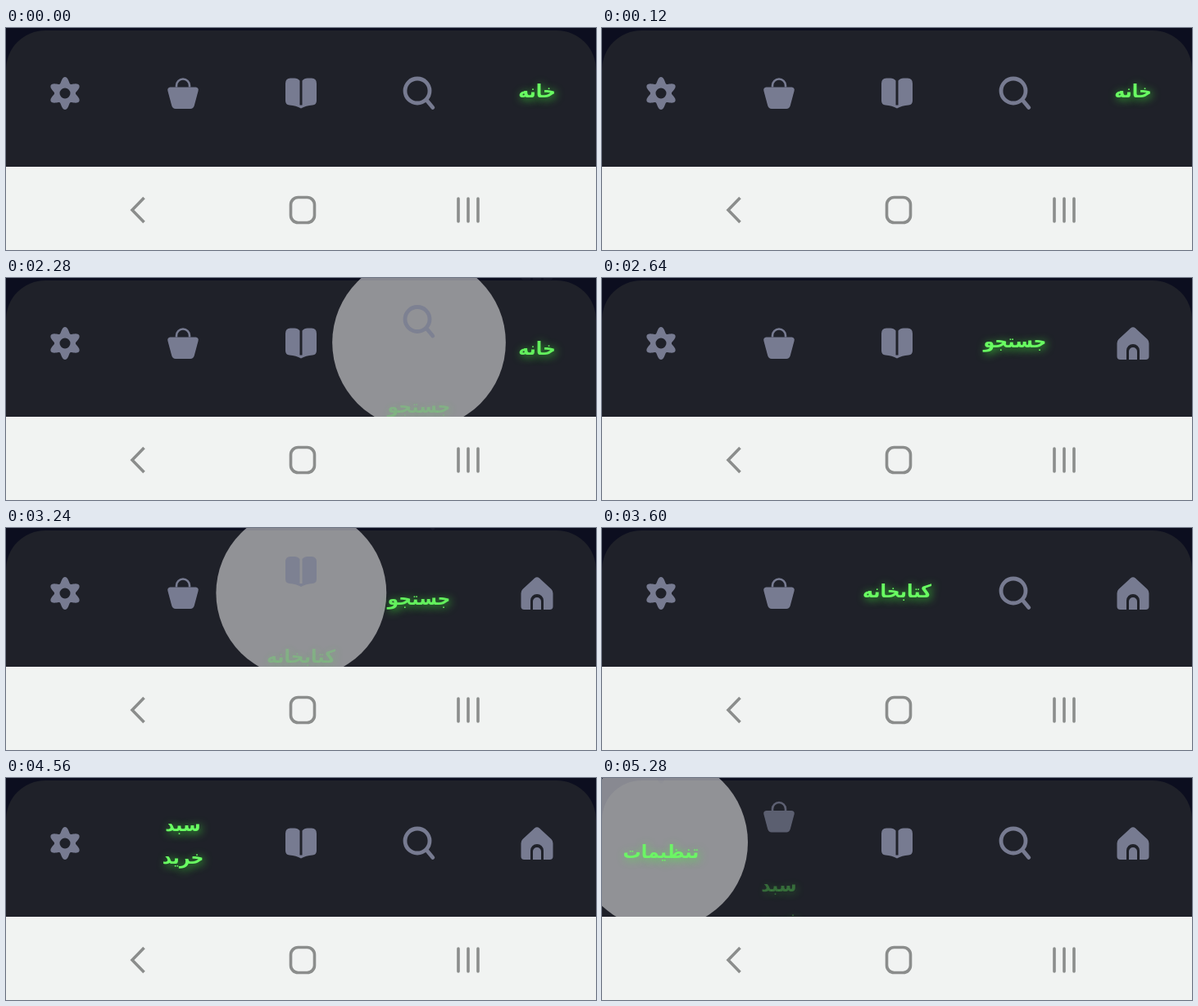
Write an HTML page with a canvas that moves like this. It is 720 px wide and 272 px high and loops after 5.4 s.

```html
<!DOCTYPE html>
<html lang="fa">
<head>
<meta charset="utf-8">
<style>
  html, body { margin: 0; width: 100%; height: 100%; overflow: hidden; background: #0c0e1f; }
  canvas { display: block; }
</style>
</head>
<body>
<canvas id="stage" width="720" height="272"></canvas>
<script>
const ctx = document.getElementById('stage').getContext('2d');
const LOOP = 5400, STEP = 120;
const BAR_BOTTOM = 170, TRAVEL = 106, LAG = 45, MOVE = 300;
const ICON = '#777b91', GREEN = '#69ff62';

// press: touch down, shift: icons start to slide, fade: ripple starts to vanish
const taps = [
  { press: 1993, shift: 2180, fade: 2285 },
  { press: 2990, shift: 3140, fade: 3245 },
  { press: 3885, shift: 4027, fade: 4165 },
  { press: 4925, shift: 5047, fade: 5285 }
];

const clamp = v => Math.max(0, Math.min(1, v));
const easeInOut = v => (1 - Math.cos(Math.PI * clamp(v))) / 2;
const easeOut = v => 1 - (1 - clamp(v)) ** 2;

function gearPath() {
  const path = new Path2D();
  for (let deg = 0; deg < 360; deg += 3) {
    const a = deg * Math.PI / 180;
    const r = 16.4 - 3.5 * Math.cos(6 * a);
    path.lineTo(r * Math.cos(a), r * Math.sin(a));
  }
  path.closePath();
  path.moveTo(6.5, 0);
  path.arc(0, 0, 6.5, 0, 2 * Math.PI);
  return path;
}

function searchPath() {
  const path = new Path2D();
  path.arc(-2, -3, 15, Math.PI / 4, Math.PI * 9 / 4);
  path.lineTo(16.8, 17.5);
  return path;
}

const items = [
  { lines: ['تنظیمات'], fill: gearPath() },
  {
    lines: ['سبد', 'خرید'],
    fill: new Path2D('M-15.5,-7.5H15.5Q19.5,-7 18.6,-3L13.8,15Q12.6,19 9,19H-9Q-12.6,19 -13.8,15L-18.6,-3Q-19.5,-7 -15.5,-7.5Z'),
    stroke: new Path2D('M-8,-7.5V-9.5A8,8 0 0 1 8,-9.5V-7.5'), width: 2.6, cap: 'butt'
  },
  {
    lines: ['کتابخانه'],
    fill: new Path2D('M-1.5,-15.5Q-4,-18.5 -8,-18.5H-13Q-19,-18.5 -19,-12V9Q-19,14 -14,14.5Q-6,15 0,18.5' +
      'Q6,15 14,14.5Q19,14 19,9V-12Q19,-18.5 13,-18.5H8Q4,-18.5 1.5,-15.5Z' +
      'M-1.5,-15.5H1.5V14.5H-1.5Z')
  },
  { lines: ['جستجو'], stroke: searchPath(), width: 4.8, cap: 'round' },
  {
    lines: ['خانه'],
    fill: new Path2D('M-3,-18.5Q0,-21 3,-18.5L17.5,-5Q19.5,-3 19.5,0V16Q19.5,20 15.5,20H-15.5' +
      'Q-19.5,20 -19.5,16V0Q-19.5,-3 -17.5,-5Z' +
      'M-8,20V9A8,8 0 0 1 8,9V20ZM-5,20V10A5,5 0 0 1 5,10V20Z')
  }
];
const centerX = i => 72 + 144 * i;

// 0 shows the icon, 1 shows the label
function activity(i, t) {
  const enter = taps[3 - i], leave = taps[4 - i];
  const shown = enter ? easeInOut((t - enter.shift) / MOVE) : 1;
  const gone = leave ? easeInOut((t - leave.shift - LAG) / MOVE) : 0;
  return shown - gone;
}

function drawIcon(item, x, y, alpha) {
  ctx.save();
  ctx.translate(x, y);
  ctx.globalAlpha = alpha;
  ctx.fillStyle = ctx.strokeStyle = ICON;
  if (item.fill) ctx.fill(item.fill, 'evenodd');
  if (item.stroke) {
    ctx.lineWidth = item.width;
    ctx.lineCap = item.cap;
    ctx.stroke(item.stroke);
  }
  ctx.restore();
}

function drawLabel(lines, x, y, alpha) {
  ctx.save();
  ctx.globalAlpha = alpha;
  ctx.font = 'bold 22px "DejaVu Sans", sans-serif';
  ctx.direction = 'rtl';
  ctx.textAlign = 'center';
  ctx.fillStyle = GREEN;
  ctx.shadowColor = 'rgba(70, 255, 60, 0.75)';
  ctx.shadowBlur = 11;
  ctx.shadowOffsetX = 2;
  ctx.shadowOffsetY = 2;
  lines.forEach((line, n) => ctx.fillText(line, x, y + 7 + 40 * (n - (lines.length - 1) / 2)));
  ctx.restore();
}

function drawRipple(tap, k, t) {
  const age = t - tap.press;
  const alpha = 0.51 * clamp(age / 105) * (1 - clamp((t - tap.fade) / 235));
  if (alpha <= 0) return;
  const grow = easeOut(age / 300);
  ctx.fillStyle = `rgba(255, 255, 255, ${alpha})`;
  ctx.beginPath();
  ctx.arc(centerX(3 - k) + 11.5 * (1 - grow), 79 + 25 * (1 - grow), 106 * (0.3 + 0.7 * grow), 0, 2 * Math.PI);
  ctx.fill();
}

function drawSystemBar() {
  ctx.fillStyle = '#f1f3f2';
  ctx.fillRect(0, BAR_BOTTOM, 720, 272 - BAR_BOTTOM);
  ctx.strokeStyle = '#8b8d8c';
  ctx.lineWidth = 3.6;
  ctx.lineCap = 'butt';
  ctx.stroke(new Path2D('M168.5,208L154,223L168.5,238'));
  ctx.beginPath();
  ctx.roundRect(347.5, 207.5, 29, 31, 9);
  ctx.stroke();
  ctx.lineCap = 'round';
  ctx.stroke(new Path2D('M552,209V237M564,209V237M576,209V237'));
}

function draw(t) {
  ctx.fillStyle = '#0c0e1f';
  ctx.fillRect(0, 0, 720, 272);
  ctx.save();
  ctx.beginPath();
  ctx.rect(0, 0, 720, BAR_BOTTOM);
  ctx.clip();
  ctx.fillStyle = '#1f2129';
  ctx.beginPath();
  ctx.roundRect(0, 3, 720, 200, [48, 48, 0, 0]);
  ctx.fill();
  taps.forEach((tap, k) => drawRipple(tap, k, t));
  items.forEach((item, i) => {
    const p = activity(i, t);
    if (p < 1) drawIcon(item, centerX(i), 80 - TRAVEL * p, 1 - p);
    if (p > 0) drawLabel(item.lines, centerX(i), 78 + TRAVEL * (1 - p), p);
  });
  ctx.restore();
  drawSystemBar();
}

const start = performance.now();
function frame() {
  const t = Math.max(0, performance.now() - start) % LOOP;
  draw(Math.floor(t / STEP) * STEP);
  requestAnimationFrame(frame);
}
frame();
</script>
</body>
</html>
```
